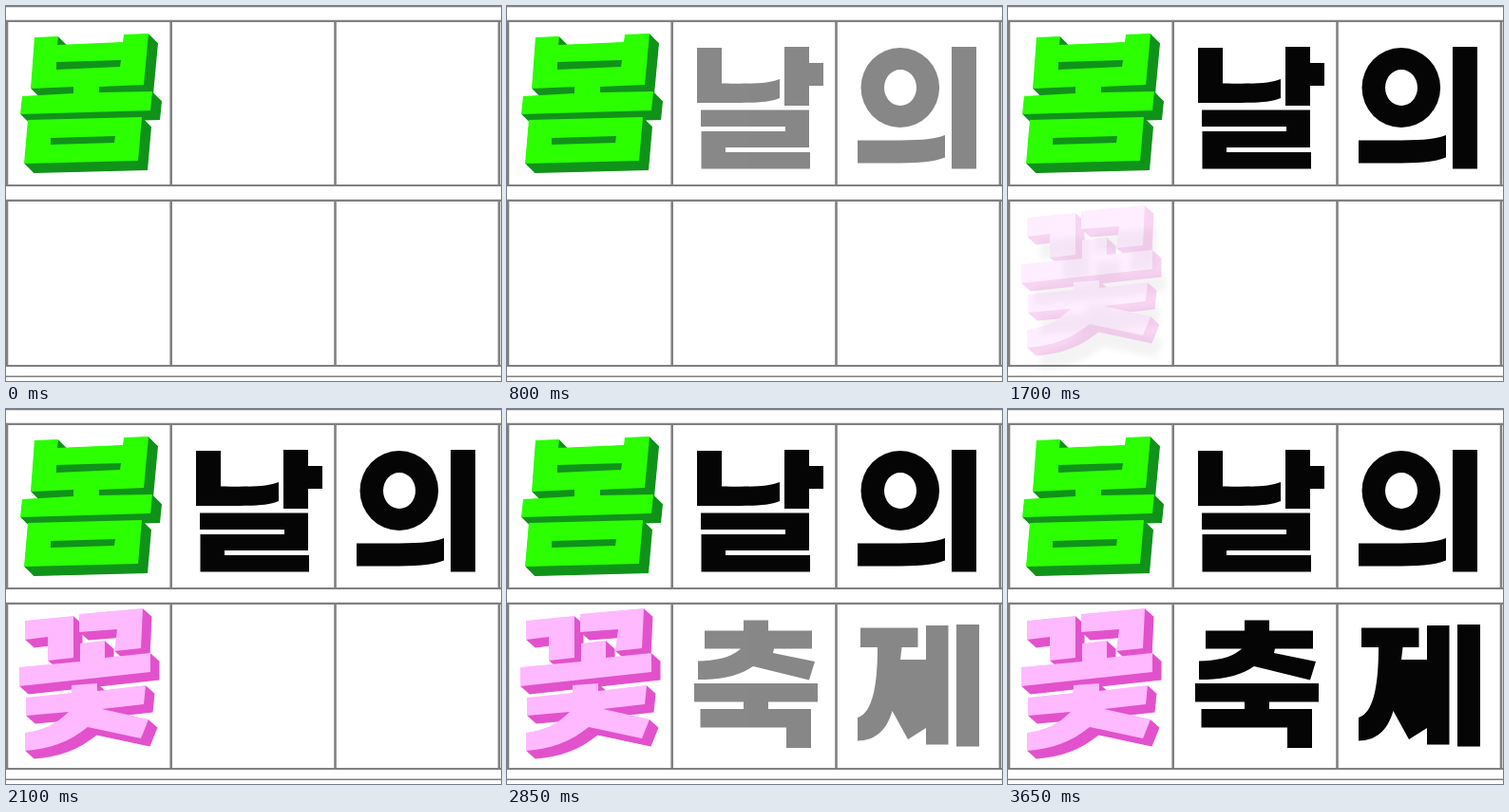
These frames come from a looping animation (521x395 px, 5.75 s). An HTML page:

```html
<!DOCTYPE html>
<html lang="ko">
<head>
<meta charset="utf-8">
<style>
html, body { margin: 0; width: 100%; height: 100%; overflow: hidden; background: #fff; }
svg { display: block; }
</style>
</head>
<body>
<svg width="521" height="395" viewBox="0 0 521 395" role="img" aria-label="봄날의 꽃축제">
  <defs>
    <path id="bom" fill-rule="evenodd" d="M30 33L55 32L54 41L123 38L124 30L150 29L145 83L98 85V91L154 90L152 110L15 114L17 95L71 92V85L26 87Z
      M53 59V67L120 64L121 57Z M23 120L143 117L139 163L19 166Z M47 139V146L114 144L115 137Z"/>
    <path id="kkot" d="M20 223L71 218V262L44 265V240L20 243Z M77 216L144 210L142 252L114 255L117 232L77 235Z
      M14 272L78 266V247L104 244V262L152 257V277L14 292Z
      M21 304L69 299V291L96 289V297L147 291L145 311L101 316L150 327L142 347L86 335C66 351 46 358 20 360V341C38 339 53 332 66 319L21 323Z"/>
  </defs>

  <g fill="none" stroke="#808080">
    <path stroke-width="1.5" d="M0 .5H521M0 390.3H521"/>
    <path stroke-width="2.2" d="M0 15.8H521M0 189H521M0 204.8H521M0 379H521"/>
    <path stroke-width="2.6" d="M1 15V190M173.7 15V190M346.5 15V190M519 15V190M1 204V380M173.7 204V380M346.5 204V380M519 204V380"/>
  </g>

  <g id="spring"></g>

  <g id="day" fill="#050505">
    <path d="M200 44H226V81.500C255 82 275 82 287 77V97C275 102 258 102 235 102H200Z
      M292 43H318V60H333V84H318V105H292Z
      M204 109.500H318V149H230V154H319V171.500H204.500V132H293V127H204Z"/>
    <path fill-rule="evenodd" d="M372.500 86a41.300 42 0 1 0 82.600 0a41.300 42 0 1 0 -82.600 0Z M397 86a17 19 0 1 0 34 0a17 19 0 1 0 -34 0Z"/>
    <path d="M369 141.500H405C430 141.500 448 141 461 136V159.500C448 165 430 165.500 405 165.500H369Z M468 43H494V171.500H468Z"/>
  </g>

  <use id="shadow" href="#kkot" transform="translate(14 24)" style="filter:blur(3px)" opacity=".045"/>
  <g id="flower"></g>

  <g id="festival" fill="#050505">
    <path d="M249 222.500H275V233.500H321V252.500H281L280 257L324 266L318 285.500L259 271C243 282 224 285 201 285V265.500C220 265 236 262 246 252.500H208V233.500H249Z
      M197 289H327V308.500H275V316H320V357H294V335.500H203.500V316H249V308.500H197Z"/>
    <path d="M372 230.500H432.500V251H415.500L414 264H441V228H464.500V353.500H441V336L422 348L405.500 318C399 340 387 349 369 349.500V325C386 320 390 286 390 251H372Z
      M473 227H497V355.500H473Z"/>
  </g>
</svg>
<script>
const LOOP = 5750;
const byId = id => document.getElementById(id);

// Sweep a flat shape down and right to build its solid side.
function extrude(target, shape, face, side, dx, dy) {
  const steps = 20;
  for (let i = steps; i >= 0; i--) {
    const copy = document.createElementNS("http://www.w3.org/2000/svg", "use");
    copy.setAttribute("href", "#" + shape);
    copy.setAttribute("fill", i ? side : face);
    copy.setAttribute("transform", `translate(${dx * i / steps} ${dy * i / steps})`);
    byId(target).append(copy);
  }
}
extrude("spring", "bom", "#2bff00", "#11931a", 10, 10);
extrude("flower", "kkot", "#ffb9ff", "#e252cc", 9.5, 8.5);

const dayTimes = [200, 300, 400, 600, 800, 1000, 1100, 1300, 1400, 1500];
const festivalTimes = [2250, 2450, 2650, 2850, 3050, 3150, 3350, 3450, 3550];
const passed = (times, t) => times.filter(time => time <= t).length;
const show = (id, opacity) => byId(id).style.opacity = Math.max(0, Math.min(1, opacity));

function draw(now) {
  const t = now % LOOP;
  show("day", (2 * passed(dayTimes, t) - 1) / 19);
  show("flower", t < 1600 ? 0 : 0.05 + 0.19 * Math.floor((t - 1600) / 100));
  byId("shadow").style.display = t >= 1600 && t < 2100 ? "" : "none";
  const count = passed(festivalTimes, t);
  show("festival", count && (2 * count + 1) / 19);
  requestAnimationFrame(draw);
}
draw(performance.now());
</script>
</body>
</html>
```
